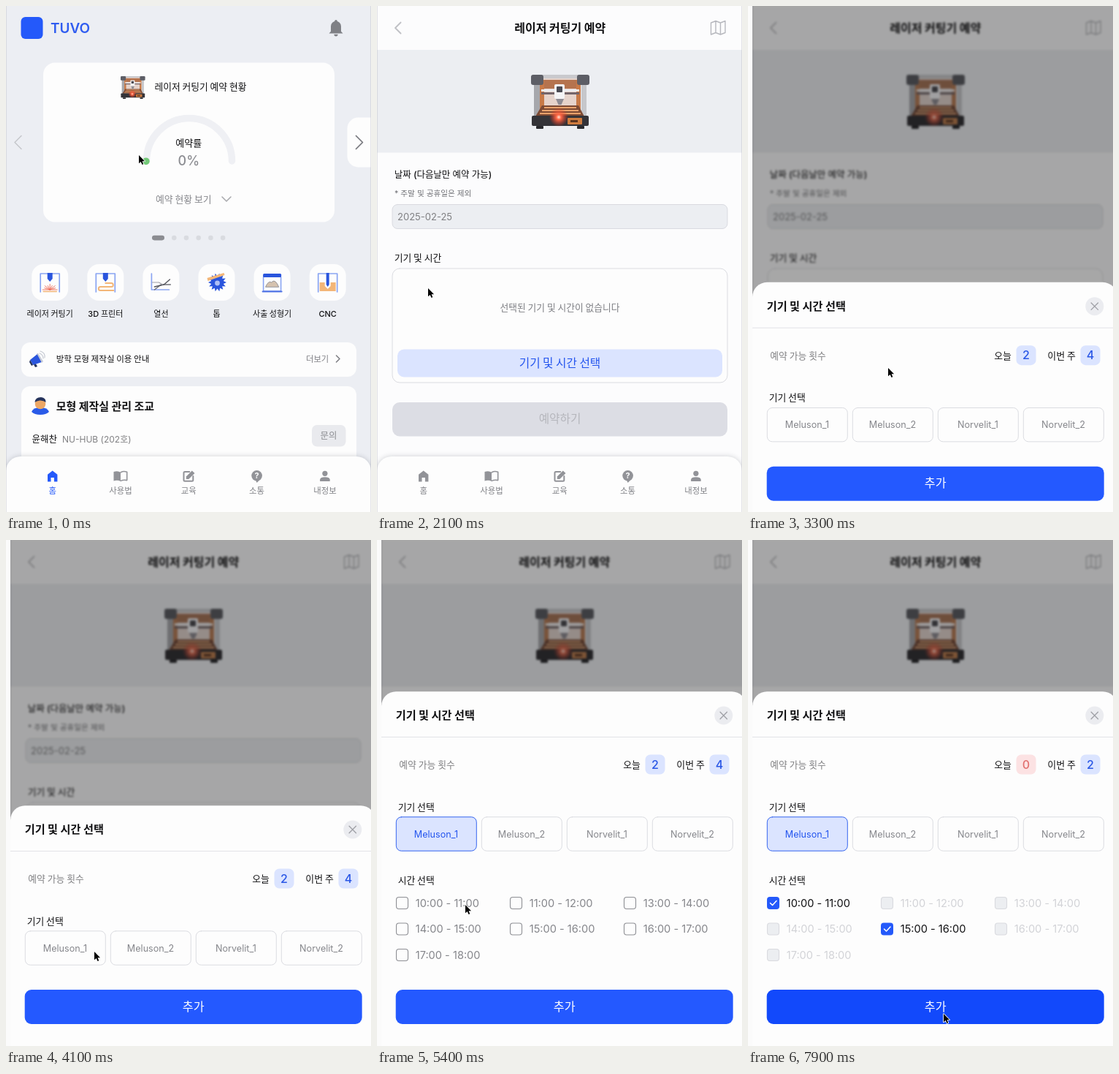
These frames come from a looping animation (500x692 px, 8000 ms). An HTML page with a canvas:

```html
<!DOCTYPE html>
<html lang="ko">
<head>
<meta charset="utf-8">
<title>예약 화면</title>
<style>
html, body { margin: 0; width: 100%; height: 100%; overflow: hidden; background: #fcfcfd; }
canvas { display: block; width: 500px; height: 692px; }
</style>
</head>
<body>
<canvas id="stage" width="500" height="692"></canvas>
<script>
const W = 500, H = 692, LOOP = 8000, STEP = 100;
const BLUE = '#2459fa', INK = '#111113', GRAY = '#808083', PALE = '#dbe4ff', WHITE = '#fdfdfd', BAND = '#eceef2';
const main = document.getElementById('stage').getContext('2d');
let c = main;

// ---- drawing helpers ----
function box(x, y, w, h, r, fill, stroke, lw = 1) {
  c.beginPath();
  c.roundRect(x, y, w, h, r);
  if (fill) { c.fillStyle = fill; c.fill(); }
  if (stroke) { c.strokeStyle = stroke; c.lineWidth = lw; c.stroke(); }
}
function dot(x, y, r, fill) {
  c.beginPath();
  c.arc(x, y, r, 0, Math.PI * 2);
  c.fillStyle = fill;
  c.fill();
}
function fillPath(d, color) { c.fillStyle = color; c.fill(new Path2D(d)); }
function line(d, color, lw = 1.5) {
  c.strokeStyle = color;
  c.lineWidth = lw;
  c.lineCap = c.lineJoin = 'round';
  c.stroke(new Path2D(d));
}
function at(x, y, fn, s = 1) {
  c.save();
  c.translate(x, y);
  c.scale(s, s);
  fn();
  c.restore();
}
function text(s, x, y, size, color = INK, weight = 400, align = 'left') {
  const kr = '"Noto Sans CJK KR", "Noto Sans CJK"';
  const family = /^[가-힣 ]+$/.test(s) ? kr : 'Inter, ' + kr;
  c.font = `${weight} ${size}px ${family}, sans-serif`;
  c.textAlign = align;
  c.fillStyle = color;
  c.fillText(s, x, y + size * 0.365);
}
const mid = (s, x, y, size, color, weight) => text(s, x, y, size, color, weight, 'center');

// ---- timing helpers ----
const clamp = v => Math.max(0, Math.min(1, v));
const part = (t, from, len) => clamp((t - from) / len);
const easeOut = p => 1 - (1 - p) ** 3;
const smooth = p => p * p * (3 - 2 * p);

// ---- pictures ----
function machine() {
  box(12, 6, 56, 50, 1, '#e6d3cb');
  box(17, 8, 46, 12, 0, '#b5734e');
  box(12, 8, 6, 48, 0, '#c87a48');
  box(62, 8, 6, 48, 0, '#c87a48');
  box(4, 12, 8, 48, 1, '#a6a7ac');
  box(69, 12, 7, 48, 1, '#c6c7cb');
  box(12, 1, 56, 5, 1, '#c9c9cd');
  box(0, 1, 17, 14, 3, '#5d5e66');
  box(63, 1, 17, 14, 3, '#5d5e66');
  box(14, 21, 52, 3, 0, '#ededf0');
  box(14, 25, 52, 3, 0, '#74656a');
  fillPath('M15 43H65L73 58H6Z', '#7d4a34');
  for (let i = 0; i < 3; i++) box(18 - i * 3, 45 + i * 4, 44 + i * 6, 2, 0, '#e9a26c');
  box(32, 14, 14, 20, 2, '#f4f3f5');
  box(35, 17, 8, 8, 1, '#4b4b53');
  fillPath('M34 34H45L41.5 42H37.5Z', '#8f8c94');
  box(1, 57, 78, 14, 2, '#343338');
  box(50, 60, 20, 9, 1, '#cf7c3f');
  box(54, 63, 10, 3, 0, '#5d351f');
  box(7, 71, 10, 4, 1, '#2a2a2e');
  box(63, 71, 10, 4, 1, '#2a2a2e');
  const glow = c.createRadialGradient(38, 59, 0, 38, 59, 13);
  glow.addColorStop(0, '#ffe3d4');
  glow.addColorStop(0.25, '#ff6a48');
  glow.addColorStop(1, 'rgba(230,50,30,0)');
  c.fillStyle = glow;
  c.fillRect(25, 46, 26, 26);
}

const SOFT = '#8aa5f2', SAND = '#f3b678';
const frame = () => line('M-13 13V-12H13V13', SOFT, 1.7);
const head = () => fillPath('M-3.5 -13h7v8l-3.5 4l-3.5 -4z', '#2a55dd');
const tools = [
  ['레이저 커팅기', () => {
    frame(); head();
    for (let i = 0; i < 9; i++) {
      const a = Math.PI * (1 + i / 8), r = i % 2 ? 8 : 10;
      line(`M0 10L${r * Math.cos(a)} ${10 + r * Math.sin(a) * 0.75}`, '#ef6b57', 0.9);
    }
    line('M-9 12.5H9', SAND, 1.6);
  }],
  ['3D 프린터', () => {
    frame(); head();
    line('M0 1H8a2.5 2.5 0 0 1 0 5H-7a2.5 2.5 0 0 0 0 5H11', SAND, 2);
  }],
  ['열선', () => {
    line('M-13 -12V10H11', SOFT, 1.7);
    line('M-9 10L0 3H13', '#6f7078', 1.4);
    line('M-9 6L4 3L12 -4', '#53545c', 1.4);
    line('M-12 0H-3L2 3', '#9fa0a8', 1.2);
  }],
  ['톱', () => {
    let d = '';
    for (let i = 0; i < 28; i++) {
      const a = i * Math.PI / 14, r = i % 2 ? 8.5 : 12.5;
      d += `${i ? 'L' : 'M'}${1 + r * Math.cos(a)} ${r * Math.sin(a)}`;
    }
    fillPath(d + 'Z', '#2a55dd');
    dot(1, 1, 3.4, '#aebff5');
    fillPath('M-13 -6L10 -13L11 -10L-12 -2Z', SAND);
  }],
  ['사출 성형기', () => {
    box(-12, -8, 24, 20, 1, null, SOFT, 1.6);
    box(-12.5, -12, 25, 5, 1.5, '#2a55dd');
    fillPath('M-9 6Q-5 -3 -1 0Q4 -6 9 6Z', '#d5c2ae');
    line('M-9 6Q-5 -3 -1 0Q4 -6 9 6Z', '#8e8f96', 0.9);
    line('M-13 12.5H13', '#4c70e4', 2);
  }],
  ['CNC', () => {
    frame();
    fillPath('M-11 0H-4V5L0 9L4 5V0H11V12H-11Z', SAND);
    fillPath('M-2 -13H2V3L0 6L-2 3Z', '#2a55dd');
  }]
];

const tabs = [
  ['홈', k => fillPath('M-6.7 7.5V-2.2L0 -7.5L6.7 -2.2V7.5H2.2V2H-2.2V7.5Z', k)],
  ['사용법', k => {
    fillPath('M-9.5 -6Q-4 -8 0 -5.3V7Q-4 4.8 -9.5 6.4Z', k);
    line('M0.3 -5.3Q4 -7.5 8.7 -5.7V5.6Q4 4.6 0.3 6.4', k, 1.6);
  }],
  ['교육', k => {
    line('M1 -6H-5.3Q-6.8 -6 -6.8 -4.5V5.3Q-6.8 6.8 -5.3 6.8H4.5Q6 6.8 6 5.3V0', k, 2);
    fillPath('M-3.5 4V0.5L4.5 -7.5L8.2 -4L0 4Z', k);
  }],
  ['소통', k => {
    dot(0, -0.7, 7.3, k);
    fillPath('M-2 5H4L0 9Z', k);
    mid('?', 0, -0.7, 11, WHITE, 700);
  }],
  ['내정보', k => {
    dot(0, -3.7, 3.6, k);
    fillPath('M-6.8 7V4.5Q-6 1.2 0 1.2Q6 1.2 6.8 4.5V7Z', k);
  }]
];

function tabBar(active) {
  c.save();
  c.shadowColor = 'rgba(40,45,60,.22)';
  c.shadowBlur = 7;
  box(0, 616, W, 100, 20, WHITE);
  c.restore();
  tabs.forEach(([name, icon], i) => {
    const x = 63.7 + i * 93.3, k = i === active ? BLUE : '#929398';
    at(x, 643, () => icon(k));
    mid(name, x, 662.7, 11.4, i === active ? BLUE : '#818287', 500);
  });
  c.fillStyle = 'rgba(120,125,140,.18)';
  c.fillRect(0, 0, 1, H);
  c.fillRect(W - 1, 0, 1, H);
}

// ---- screens ----
function home() {
  c.fillStyle = '#eceef3';
  c.fillRect(0, 0, W, H);
  box(20.5, 15, 30, 30, 6, BLUE);
  text('TUVO', 61, 30.5, 19, '#2f5cf0', 600);
  at(452, 30, () => {
    fillPath('M-9.5 7.5L-7 4.7V-2.3A7 7 0 0 1 7 -2.3V4.7L9.5 7.5Z', '#7f8085');
    dot(0, -9, 1.9, '#7f8085');
    fillPath('M-2.6 8.8H2.6A2.6 2.6 0 0 1 -2.6 8.8Z', '#7f8085');
  });

  box(51, 77.5, 399, 218, 16, WHITE);
  box(467.5, 152.5, 60, 68, 15, WHITE);
  line('M21 177.5L12 186.5L21 195.5', '#c5c6cb', 1.5);
  line('M479.5 177.5L488.5 186.5L479.5 195.5', '#77787d', 1.7);
  at(157, 95.5, machine, 0.42);
  text('레이저 커팅기 예약 현황', 203.5, 110.7, 12.75, INK, 500);
  c.beginPath();
  c.arc(251, 212, 58.5, Math.PI, 0);
  c.strokeStyle = '#eff0f4';
  c.lineWidth = 9.5;
  c.lineCap = 'round';
  c.stroke();
  dot(191.8, 212.3, 4.9, '#73c878');
  mid('예약률', 250.3, 187.3, 13, INK, 500);
  mid('0%', 250.3, 211.3, 18, '#8c8d92', 500);
  text('예약 현황 보기', 205, 264.3, 12.85, '#87888d');
  line('M296 261L302 267L308 261', '#a8a9ad', 1.5);
  box(200, 313.8, 17, 6.6, 3.3, '#8b8c91');
  for (let i = 0; i < 5; i++) dot(230.3 + i * 16.7, 317.1, 3.3, '#d9dbe0');

  tools.forEach(([name, icon], i) => {
    const x = 60.2 + i * 76.1;
    box(x - 25, 353, 50, 50, 16, WHITE);
    at(x, 378, icon);
    mid(name, x, 420.7, 11, INK, 500);
  });

  box(21, 460, 459, 47, 12, WHITE);
  at(42, 483, () => {
    fillPath('M-9 1L1 -7L7 4L-5 8Z', '#2a55dd');
    fillPath('M-9 1L-5 8L-7 9L-10 4Z', '#24325c');
    fillPath('M-4 7.5L-1 6.5L1 10L-2 11Z', '#24325c');
    fillPath('M0 -8L2 -8L9 3L7 5Z', '#c5cad6');
    line('M4 -8Q9 -6 9 -1M5 -11Q12 -9 11 -2', '#c3c7d0', 1.1);
  });
  text('방학 모형 제작실 이용 안내', 68.7, 482.8, 11.6, INK, 500);
  text('더보기', 411, 482.8, 11.3, '#808186');
  line('M452.5 478L457 482.5L452.5 487', '#808186', 1.6);

  box(21, 520, 459, 120, 12, WHITE);
  at(47, 547, () => {
    fillPath('M-12 8Q-10 2 0 2Q10 2 12 8Q8 12 0 12Q-8 12 -12 8Z', '#2a5be8');
    dot(0, -3, 7.3, '#eda765');
    fillPath('M-7.6 -5Q-7 -12 1 -12Q8 -11 7.6 -5Q4 -8 -1 -7.5Q-5 -7 -7.6 -5Z', '#26345c');
  });
  text('모형 제작실 관리 조교', 68.7, 547.2, 15, INK, 600);
  text('윤해찬', 35.6, 592.3, 12.5, INK, 500);
  text('NU-HUB (202호)', 77, 592.3, 12, GRAY);
  box(419, 573, 46.5, 29.5, 7, '#e9eaee');
  mid('문의', 442, 587.3, 12.4, '#8b8c91', 500);
  tabBar(0);
}

function booking(hover, pressed) {
  c.fillStyle = '#fcfcfd';
  c.fillRect(0, 0, W, H);
  c.fillStyle = BAND;
  c.fillRect(0, 60, W, 140.5);
  line('M32.5 22.5L25 30L32.5 37.5', '#c0c1c6', 1.9);
  mid('레이저 커팅기 예약', 250.7, 30.2, 16, INK, 600);
  line('M457.5 23L464 20.5L470.5 23L477 20.5V36.5L470.5 39L464 36.5L457.5 39ZM464 20.5V36.5M470.5 23V39', '#b7b8be', 1.4);
  at(211, 93, machine);

  text('날짜 (다음날만 예약 가능)', 23.7, 230.8, 12.45, INK, 500);
  text('* 주말 및 공휴일은 제외', 24, 255.7, 10.65, '#707176');
  box(21, 271.5, 459, 33, 7, BAND, '#d9dae0');
  text('2025-02-25', 28, 288.2, 13, GRAY);
  text('기기 및 시간', 23.7, 344.7, 12.8, INK, 500);
  box(21, 359, 459, 156, 10, WHITE, '#dbdce1');
  mid('선택된 기기 및 시간이 없습니다', 250.5, 412.2, 12.75, '#7d7e83');
  at(250.5, 488.5, () => {
    box(-222.5, -19, 445, 38, 9, hover ? '#bdcfff' : PALE);
    mid('기기 및 시간 선택', 0, -0.5, 15.7, '#2455ee', 500);
  }, pressed ? 0.975 : 1);
  box(21, 542, 459, 46.5, 10, '#dcdde4');
  mid('예약하기', 250.5, 564.7, 15.7, '#b5b6bc', 500);
  tabBar(-1);
}

// Blurred copy of the booking screen for the area behind the sheet
const blurred = (() => {
  const make = () => Object.assign(document.createElement('canvas'), { width: W, height: H });
  const sharp = make(), soft = make();
  c = sharp.getContext('2d');
  booking(false, false);
  c = soft.getContext('2d');
  c.drawImage(sharp, 0, 0);
  c.filter = 'blur(1.8px) saturate(0.75)';
  c.drawImage(sharp, 0, 0);
  c = main;
  return soft;
})();

const machines = ['Meluson_1', 'Meluson_2', 'Norvelit_1', 'Norvelit_2'];
const hours = [10, 11, 13, 14, 15, 16, 17];
const PICKS = [[10, 5600], [15, 6500]];

function badge(x, y, n) {
  box(x, y, 27, 27, 7, n ? PALE : '#fce2e3');
  mid(String(n), x + 13.5, y + 13.3, 16, n ? '#2a57e6' : '#e2706f', 500);
}

function slot(hour, i, y, t) {
  const x = 26 + (i % 3) * 156, cy = y + Math.floor(i / 3) * 35.5;
  const on = PICKS.some(([h, when]) => h === hour && t >= when);
  const off = !on && t >= PICKS[1][1];
  if (on) {
    box(x, cy - 8.5, 17, 17, 4, BLUE);
    line(`M${x + 4.5} ${cy}l3 3l5.5 -6`, '#fff', 1.5);
  } else {
    box(x + 0.5, cy - 8, 16, 16, 3.5, off ? '#eceef1' : WHITE, off ? '#d9dadf' : '#8e8f94', 1.1);
  }
  text(`${hour}:00 - ${hour + 1}:00`, x + 26.7, cy, 14.6, on ? INK : off ? '#d2d3d7' : '#85868b');
}

function sheet(t) {
  const slide = 328 * (1 - easeOut(part(t, 3100, 310)));
  const top = 364 - 156 * easeOut(part(t, 4250, 200));
  const picked = t >= 4250;
  const used = PICKS.filter(p => t >= p[1]).length;

  c.fillStyle = '#fbfbfb';
  c.fillRect(0, 0, 6, H);
  c.drawImage(blurred, 6, 0);
  c.fillStyle = `rgba(0,0,0,${0.34 * part(t, 3100, 200)})`;
  c.fillRect(6, 0, W, H);

  c.save();
  c.translate(0, slide);
  box(6, top - 0.8, 500, 800, 20, WHITE);
  text('기기 및 시간 선택', 25.7, top + 31.6, 15.2, INK, 600);
  dot(474.8, top + 32, 12.5, '#ebecf0');
  at(474.8, top + 32, () => line('M-4.7 -4.7L4.7 4.7M4.7 -4.7L-4.7 4.7', '#9fa0a6', 1.3));
  c.fillStyle = '#e2e3e7';
  c.fillRect(6, top + 61, W, 1);
  text('예약 가능 횟수', 30.3, top + 99.2, 12.8, GRAY);
  text('오늘', 337.3, top + 99.2, 12.8, INK, 500);
  badge(367.5, top + 85.5, 2 - used);
  text('이번 주', 410.3, top + 99.2, 12.9, INK, 500);
  badge(455.5, top + 85.5, 4 - used);

  text('기기 선택', 28.7, top + 157, 12.8, INK, 500);
  machines.forEach((name, i) => {
    const x = 26 + i * 117, on = picked && i === 0;
    box(x + 0.3, top + 170.8, 110, 46.4, 7, on ? PALE : WHITE, on ? '#3565ef' : '#dbdce1');
    mid(name, x + 55, top + 194, 12.6, on ? '#2455ee' : '#85868b');
  });

  if (picked) {
    c.save();
    c.beginPath();
    c.rect(6, top, W, 605 - top);
    c.clip();
    text('시간 선택', 28.7, top + 257, 12.8, INK, 500);
    hours.forEach((h, i) => slot(h, i, top + 288.5, t));
    c.restore();
  }
  box(25.7, 615, 462, 47, 9, t >= 7100 ? '#1249fb' : '#2459ff');
  mid('추가', 256.7, 637.6, 16.2, '#fff', 500);
  c.restore();
}

// ---- pointer: time, x, y ----
const track = [
  [0, 182, 204], [100, 182, 204], [600, 63, 381], [1200, 70, 386], [2100, 70, 386],
  [2700, 192, 495], [3400, 192, 495], [4000, 121, 563], [4400, 121, 563],
  [5200, 121, 499], [5800, 121, 499], [6300, 212, 534], [6600, 212, 534],
  [7400, 268, 648], [LOOP, 268, 648]
];
function pointer(t) {
  const i = track.findIndex(k => k[0] > t);
  const [t0, x0, y0] = track[i - 1], [t1, x1, y1] = track[i];
  const p = smooth(part(t, t0, t1 - t0));
  at(x0 + (x1 - x0) * p, y0 + (y1 - y0) * p, () => {
    const d = 'M0 0V12.6L3 9.9L5 14.4L7 13.5L5.1 9.2H9Z';
    line(d, '#fff', 1.8);
    fillPath(d, '#000');
  }, 0.9);
}

function draw() {
  const now = performance.now() % LOOP;
  const t = Math.floor(now / STEP) * STEP;
  c.clearRect(0, 0, W, H);
  if (t < 700) home();
  else if (t < 3100) booking(t >= 2600, t >= 2900);
  else sheet(t);
  pointer(t);
  requestAnimationFrame(draw);
}
draw();
</script>
</body>
</html>
```
